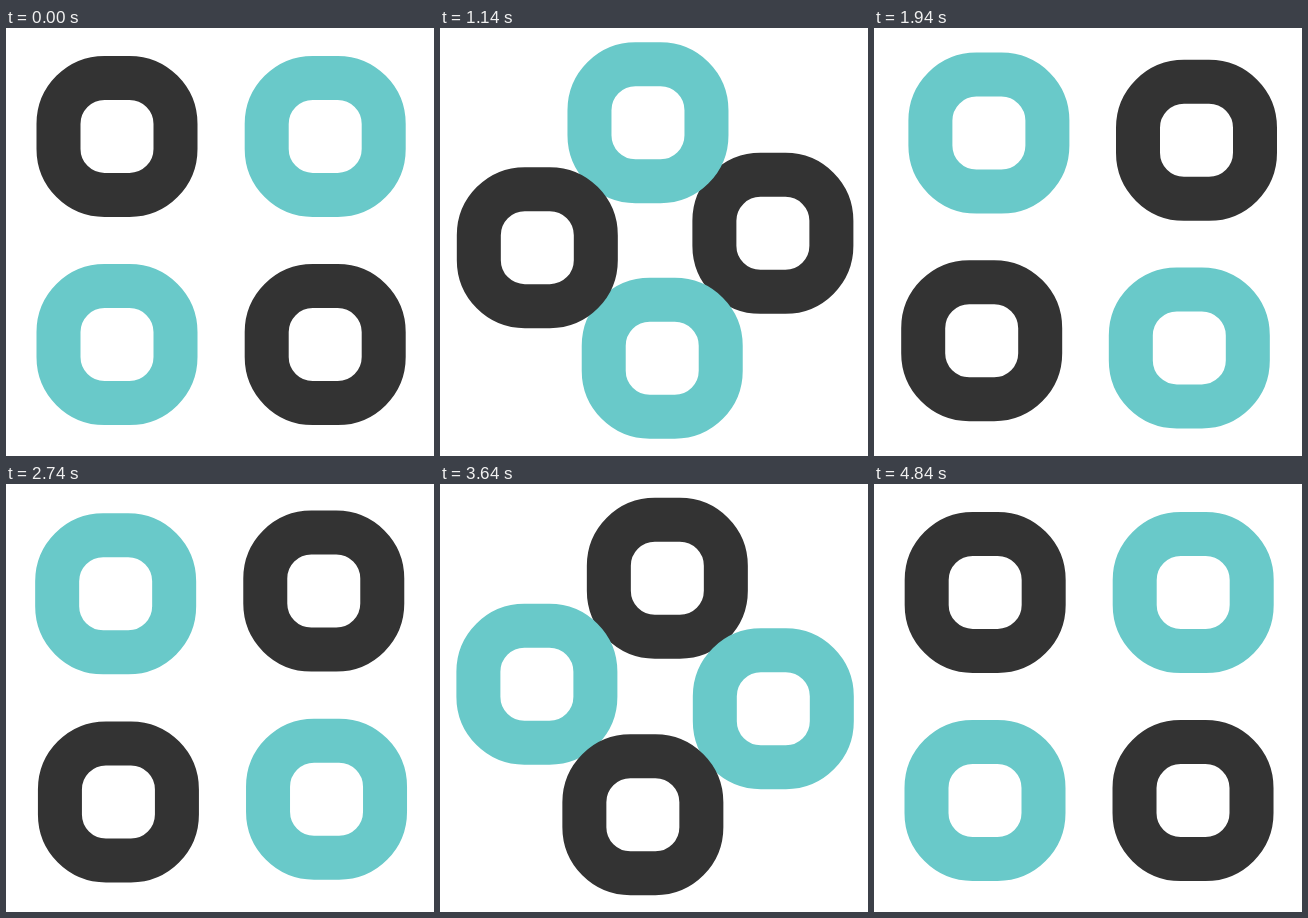
These frames come from a looping animation (428 px wide and 428 px high, 4.94 s). An HTML page with a canvas:

```html
<!DOCTYPE html>
<html lang="en">
<head>
<meta charset="utf-8">
<title>Orbiting rings</title>
<style>
  html, body { margin: 0; width: 100%; height: 100%; overflow: hidden; background: #fff; }
  canvas { display: block; width: 428px; height: 428px; }
</style>
</head>
<body>
<canvas id="stage" width="428" height="428"></canvas>
<script>
const ctx = document.getElementById('stage').getContext('2d');
const LOOP = 4940, FIRST = 40, STEP = 100;
const CX = 215.1, CY = 212.5;
const A = 104.1, C = A / 3;
const SIDE = 117, RADIUS = 46, WEIGHT = 44;
const DARK = '#333333', TEAL = '#69c9c9';

const bez = (a, b, c, d, s) => {
  const r = 1 - s;
  return r * r * r * a + 3 * r * r * s * b + 3 * r * s * s * c + s * s * s * d;
};

// Time easing with flat ends; x1 and x2 are the handle positions.
function ease(x, x1, x2) {
  let lo = 0, hi = 1;
  for (let i = 0; i < 30; i++) {
    const mid = (lo + hi) / 2;
    if (bez(0, x1, x2, 1, mid) < x) lo = mid; else hi = mid;
  }
  return bez(0, 0, 1, 1, lo);
}

// Curve sampled once so it can be followed at even speed.
function makePath(p0, p1, p2, p3) {
  const pts = [];
  let len = 0;
  for (let i = 0; i <= 200; i++) {
    const [x, y] = [0, 1].map(k => bez(p0[k], p1[k], p2[k], p3[k], i / 200));
    const last = pts[i - 1];
    if (last) len += Math.hypot(x - last.x, y - last.y);
    pts.push({ x, y, len });
  }
  return p => {
    const want = p * len;
    let i = 1;
    while (i < 200 && pts[i].len < want) i++;
    const a = pts[i - 1], b = pts[i], f = (want - a.len) / (b.len - a.len);
    return [a.x + (b.x - a.x) * f, a.y + (b.y - a.y) * f];
  };
}

const down = makePath([-A, -A], [-A, -A + C], [-A - C, A - C], [-A, A]);
const across = makePath([-A, A], [-A + C, A + C], [A - C, A], [A, A]);

// Offset from the centre; u runs 0..2 over the two legs.
function orbit(u) {
  return u < 1 ? down(ease(u, 0.783, 0.15)) : across(ease(u - 1, 0.784, 0.191));
}

function ring(x, y, color) {
  ctx.strokeStyle = color;
  ctx.lineWidth = WEIGHT;
  ctx.beginPath();
  ctx.roundRect(CX + x - SIDE / 2, CY + y - SIDE / 2, SIDE, SIDE, RADIUS);
  ctx.stroke();
}

function draw(t) {
  const tick = t < FIRST ? 0 : 1 + Math.floor((t - FIRST) / STEP);
  const [x, y] = orbit(tick / 25);
  ctx.fillStyle = '#fff';
  ctx.fillRect(0, 0, 428, 428);
  // Back to front: one dark ring lies under the teal pair, one above.
  ring(-x, -y, DARK);
  ring(y, -x, TEAL);
  ring(-y, x, TEAL);
  ring(x, y, DARK);
}

const start = performance.now();
function frame() {
  draw((performance.now() - start) % LOOP);
  requestAnimationFrame(frame);
}
frame();
</script>
</body>
</html>
```
